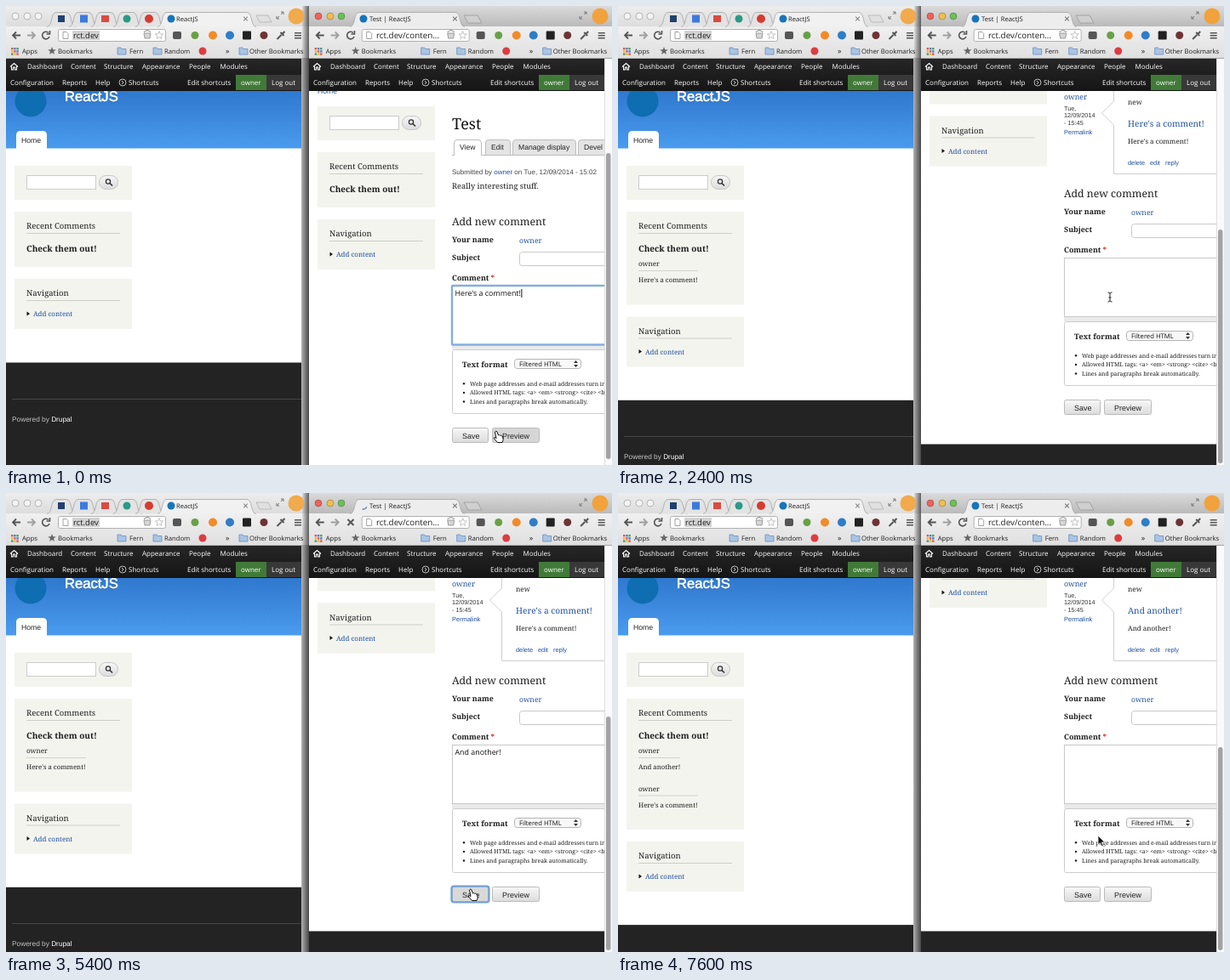
Write an HTML page that moves like this. It is 712 px wide and 540 px high and loops after 7.8 s.

```html
<!DOCTYPE html>
<html lang="en">
<head>
<meta charset="utf-8">
<title>Live comments</title>
<style>
html, body { margin: 0; width: 100%; height: 100%; overflow: hidden; background: #fff; }
svg { display: block; width: 712px; height: 540px; }
text { white-space: pre; text-rendering: geometricPrecision; }
.ui { font-family: "Open Sans", "Noto Sans", sans-serif; }
.sans { font-family: "Liberation Sans", Arial, sans-serif; }
.serif { font-family: "Noto Serif", Georgia, serif; }
</style>
</head>
<body>
<svg id="stage" viewBox="0 0 712 540" xmlns="http://www.w3.org/2000/svg"></svg>
<script>
const LOOP = 7800, STEP = 200;
const USER = 'owner', LINK = '#1f4f9e', INK = '#1e1e1e';
const FIRST = "Here's a comment!", SECOND = 'And another!';
const RIGHT = 356;

const esc = s => s.replace(/&/g, '&amp;').replace(/</g, '&lt;');
const text = (font, x, y, s, size, fill = INK, extra = '') =>
  `<text class="${font}" x="${x}" y="${y}" font-size="${size}" fill="${fill}" ${extra}>${esc(s)}</text>`;
const ui = (...a) => text('ui', ...a);
const sans = (...a) => text('sans', ...a);
const serif = (...a) => text('serif', ...a);
const bold = (x, y, s, size, fill = INK) => serif(x, y, s, size, fill, 'font-weight="700"');
const rect = (x, y, w, h, fill, extra = '') =>
  `<rect x="${x}" y="${y}" width="${w}" height="${h}" fill="${fill}" ${extra}/>`;
const circle = (x, y, r, fill, extra = '') => `<circle cx="${x}" cy="${y}" r="${r}" fill="${fill}" ${extra}/>`;
const path = (d, fill = 'none', stroke = 'none', w = 1, extra = '') =>
  `<path d="${d}" fill="${fill}" stroke="${stroke}" stroke-width="${w}" ${extra}/>`;
const group = (s, x = 0, y = 0, extra = '') => `<g transform="translate(${x} ${y})" ${extra}>${s}</g>`;
const hline = (x, y, w, color = '#cfcfca') => rect(x, y, w, 1, color);
const gradient = (id, a, b, flat) =>
  `<linearGradient id="${id}" x2="${flat ? 1 : 0}" y2="${flat ? 0 : 1}"><stop stop-color="${a}"/><stop offset="1" stop-color="${b}"/></linearGradient>`;
const clip = (id, x, w) => `<clipPath id="${id}">${rect(x, 100, w, 440, '#000')}</clipPath>`;

const defs = `<defs>
  ${gradient('sky', '#2f78ce', '#4a9bee')}${gradient('bar', '#262626', '#151515')}
  ${gradient('button', '#f7f7f7', '#dcdcdc')}${gradient('tool', '#f0f0f0', '#dfdfdf')}
  ${gradient('strip0', '#ededed', '#dcdcdc')}${gradient('strip1', '#dadada', '#b9b9b9')}
  ${gradient('edge', '#0001', '#0009', true)}
  ${clip('leftPage', 0, 347)}${clip('rightPage', 356, 347)}</defs>`;

// ---------- browser frame ----------
const star = (x, y, r, fill, stroke = 'none') => {
  const pts = Array.from({ length: 10 }, (_, i) => {
    const a = Math.PI * (i / 5 - 0.5), q = i % 2 ? r * 0.42 : r;
    return `${(x + q * Math.cos(a)).toFixed(1)} ${(y + q * Math.sin(a)).toFixed(1)}`;
  });
  return path(`M${pts.join('L')}Z`, fill, stroke, 0.8);
};
const folder = (x, y) => path(`M${x - 5} ${y - 4}h4l1 1.5h5v6.5h-10z`, '#a9c4e4', '#6c8fbb', 0.8);
const tabShape = (x, w, fill) =>
  path(`M${x} 24.5C${x + 7} 24 ${x + 4} 7.5 ${x + 11} 7.5H${x + w - 11}C${x + w - 4} 7.5 ${x + w - 7} 24 ${x + w} 24.5`, fill, '#a5a5a5', 0.8);
const cross = (x, y, r, color, w) => path(`M${x - r} ${y - r}l${2 * r} ${2 * r}m0 ${-2 * r}l${-2 * r} ${2 * r}`, 'none', color, w);

function tools() {
  const dark = '#555';
  let s = path('M17 34.5H8m4-4l-4 4l4 4', 'none', dark, 1.8)
    + path('M25 34.5h9m-4-4l4 4l-4 4', 'none', '#a0a0a0', 1.8)
    + rect(61.5, 27.5, 126, 14, '#fff', 'rx="2" stroke="#b0b0b0"')
    + path('M67 30.5h4l2 2v6h-6z', '#fff', '#8b8b8b', 0.8)
    + path('M162 32h8l-1 6h-6z', '#d6d6d6', '#888', 0.8) + path('M162 31c2-3 6-3 8 0', 'none', '#777')
    + star(180, 34.5, 5, '#fff', '#b5b5b5');
  s += rect(196, 30, 10, 9, '#555', 'rx="2"') + circle(222, 34.5, 4.5, '#69a046')
    + circle(243, 34.5, 5, '#f18b28') + circle(263, 34.5, 5, '#2f7dc6')
    + rect(278, 29.5, 10, 10, '#222', 'rx="1"') + circle(303, 34.5, 4.5, '#6d3335')
    + path('M318.5 39l5-5m-1-3l4 4m-2-2l3-3', 'none', dark, 2);
  for (const y of [31, 34, 37]) s += rect(339, y, 8, 1.5, dark);
  const hues = ['#e2574c', '#f3b23c', '#4f9d55', '#4682d8'];
  for (let i = 0; i < 9; i++) s += rect(6 + i % 3 * 3.2, 49 + (i / 3 | 0) * 3.2, 2.4, 2.4, hues[i * 3 % 4]);
  s += ui(19, 56, 'Apps', 7.7) + star(54, 53, 5, '#666') + ui(61, 56, 'Bookmarks', 7.7)
    + folder(136, 53) + ui(145, 56, 'Fern', 7.7) + folder(178, 53) + ui(186, 56, 'Random', 7.7)
    + circle(231, 53, 4.5, '#dd3c40') + ui(258, 56, '»', 9) + folder(279, 53)
    + ui(286, 56, 'Other Bookmarks', 7.7);
  return s;
}

const corner = x => path(`M${x + 1} 10l3-3m-3 0h3v3M${x - 1} 12l-3 3m3 0h-3v-3`, 'none', '#777', 1);
const reload = x => path(`M${x + 3} 31.5a4.3 4.3 0 1 0 1 4.5M${x + 4.5} 29v4h-4`, 'none', '#555', 1.6);

function leftFrame() {
  let s = rect(0, 0, 356, 25, 'url(#strip0)') + rect(0, 24, 356, 38, 'url(#tool)') + hline(0, 61, 356, '#b4b4b4');
  for (const x of [11, 25, 38]) s += circle(x, 12, 4, '#f4f4f4', 'stroke="#b5b5b5"');
  for (let i = 0; i < 5; i++) s += tabShape(48 + i * 26, 34, '#e3e3e3');
  s += rect(61, 11, 8, 8, '#20406f') + rect(87, 10.5, 9, 9, '#3c7ade') + rect(112, 11, 9, 8, '#d84c41')
    + circle(142, 15, 4.5, '#2b9985') + circle(168, 15, 5, '#d63b30')
    + tabShape(178, 116, '#f1f1f1') + circle(194, 15, 4.5, '#1676ba')
    + ui(200, 18, 'ReactJS', 7.6) + cross(281.5, 15, 2.3, '#888', 1.1)
    + path('M294 11h14l4 8h-14z', '#e0e0e0', '#b0b0b0', 0.8)
    + corner(322)
    + tools() + reload(47) + rect(78, 29, 32, 11, '#d2d2d2') + ui(79, 38, 'rct.dev', 9.5);
  return s;
}

function rightFrame() {
  let s = rect(356, 0, 356, 25, 'url(#strip1)') + rect(356, 24, 356, 38, 'url(#tool)') + hline(356, 61, 356, '#a4a4a4');
  [['#f0625a', 367], ['#f2bd4b', 381], ['#6cc057', 394]].forEach(([c, x]) => s += circle(x, 12, 4, c, 'stroke="#0005" stroke-width=".7"'));
  s += tabShape(404, 135, '#ededed') + ui(427, 18, 'Test | ReactJS', 7.7) + cross(527.5, 15, 2.3, '#777', 1.1)
    + path('M538 11h16l5 9h-16z', '#cfcfcf', '#999', 0.8)
    + corner(678) + circle(698, 12, 9.5, '#f1a23c')
    + group(tools(), 356.7) + ui(435, 38, 'rct.dev/conten...', 9.85)
    + `<g id="idle">${circle(420, 15, 4.5, '#1676ba')}${reload(405)}</g>`
    + `<g id="busy">${cross(405, 34.5, 3.5, '#555', 2)}${path('M420 11a4 4 0 0 1 4 4', 'none', '#7186a5', 1.5, 'id="spin"')}</g>`;
  return s;
}

function menu(x) {
  let s = rect(0, 62, 347, 38, 'url(#bar)') + rect(270, 81, 36, 18, '#417a38') + rect(306, 81, 41, 18, '#383838')
    + path('M5 71.5l4.5-4l4.5 4M6.5 71v4h2v-3h2v3h2v-4', 'none', '#fff', 1.1)
    + circle(137, 90, 4, 'none', 'stroke="#bbb"') + path('M136 88l2 2l-2 2', 'none', '#ccc');
  const rows = [
    [74.3, [25, 'Dashboard'], [76, 'Content'], [115, 'Structure'], [160, 'Appearance'], [215, 'People'], [251.5, 'Modules']],
    [93, [5, 'Configuration'], [66, 'Reports'], [105, 'Help'], [144, 'Shortcuts'], [213, 'Edit shortcuts'], [276, USER], [312, 'Log out']]
  ];
  for (const [y, ...items] of rows) for (const [tx, label] of items) s += ui(tx, y, label, 8, '#fff');
  return group(s, x);
}

// ---------- pages ----------
function sidebar(comments) {
  const grow = comments.length * 44.5, paper = '#f3f4ee';
  let s = rect(10, 188, 138, 40, paper) + rect(24.5, 199.5, 81, 16, '#fff', 'stroke="#ccc"')
    + rect(109.5, 199.5, 22, 16, 'url(#button)', 'rx="8" stroke="#c6c6c6"')
    + circle(120, 206.5, 2.6, 'none', 'stroke="#333" stroke-width="1.3"') + path('M122 208.5l3 3', 'none', '#333', 1.6)
    + rect(10, 242, 138, 65 + grow, paper) + serif(24, 262, 'Recent Comments', 9.5) + hline(24, 267, 110)
    + bold(24, 289, 'Check them out!', 10);
  comments.forEach((c, i) => {
    const y = 306 + i * 44.5;
    s += serif(24, y, USER, 8) + hline(24, y + 5, c === FIRST ? 70 : 49, '#d3d3ce') + serif(24, y + 19, c, 7.8);
  });
  const nav = rect(10, 321, 138, 59, paper) + serif(24, 341, 'Navigation', 9.5) + hline(24, 346, 110)
    + path('M24.5 359.5l3.5 2.5l-3.5 2.5z', '#111') + serif(32, 365, 'Add content', 8, LINK);
  return s + group(nav, 0, grow);
}

function leftPage(comments) {
  const y = 419.5 + comments.length * 44.3;
  return sidebar(comments) + rect(0, y, 347, 540, '#232323') + hline(7, Math.round(y + 42.5), 340, '#454545')
    + `<text class="sans" x="7" y="${y + 69.5}" font-size="8.3" fill="#c4c4c4">Powered by <tspan fill="#fff">Drupal</tspan></text>`;
}

const header = rect(0, 100, 347, 67.5, 'url(#sky)') + circle(29, 112, 18.5, '#0f6db2')
  + sans(69, 113, 'ReactJS', 16.6, '#1c4f8d') + sans(69, 112, 'ReactJS', 16.6, '#fff', 'stroke="#fff" stroke-width=".6"')
  + path('M12 168V152q0-5 5-5h26q5 0 5 5v16z', '#fff') + sans(18, 160.5, 'Home', 8.7, '#222');

function article() {
  const tab = (x, w, s, fill = '#e4e4e4') =>
    path(`M${x + 0.5} 175V161q0-3.5 3.5-3.5h${w - 7}q3.5 0 3.5 3.5v14`, fill, '#bdbdbd') + sans(x + 7, 169, s, 8.6, '#222');
  return sans(366, 103, 'Home', 8.6, LINK) + serif(524, 145, 'Test', 18, '#111')
    + hline(524, 175, 180, '#bdbdbd') + tab(563, 29, 'Edit') + tab(595, 74, 'Manage display') + tab(672, 40, 'Devel')
    + tab(526, 32, 'View', '#fff') + rect(527, 174, 31, 2, '#fff')
    + `<text class="sans" x="524" y="198" font-size="8.05" fill="#444">Submitted by <tspan fill="${LINK}">${USER}</tspan> on Tue, 12/09/2014 - 15:02</text>`
    + serif(524, 215, 'Really interesting stuff.', 9.25);
}

function reply(comment) {
  let s = serif(524, 110, USER, 8.8, LINK) + sans(524, 151, 'Permalink', 7.5, LINK);
  ['Tue,', '12/09/2014', '- 15:45'].forEach((line, i) => s += sans(524, 123 + i * 8.3, line, 7.3, '#333'));
  s += path('M582.5 95v17l-14 14l14 14v57.5H712', '#fff', '#cfcfcf')
    + serif(599, 116, 'new', 8.2) + serif(599, 142, comment, 10.1, LINK) + serif(599, 162, comment, 8);
  [[599, 'delete'], [625, 'edit'], [643, 'reply']].forEach(([x, w]) => s += sans(x, 186.5, w, 7.4, LINK));
  return s + rect(356, 515.5, 347, 25, '#232323');
}

function form() {
  const button = (id, x, w, s, tx) =>
    rect(x + 0.5, 496.5, w - 1, 17, 'url(#button)', `id="${id}" rx="2" stroke="#bbb"`) + sans(tx, 508.5, s, 9, '#222');
  let s = serif(524, 258, 'Add new comment', 12.3) + bold(524, 278, 'Your name', 8.9)
    + serif(603, 278.5, USER, 8.6, LINK) + bold(524, 299, 'Subject', 8.8)
    + rect(603.5, 289.5, 120, 16, '#fff', 'rx="3" stroke="#c9c9c9"') + bold(524, 323, 'Comment', 8.9) + bold(569.5, 323, '*', 8.9, '#d22')
    + rect(524, 398, 190, 6, '#eaeaea') + rect(524.5, 404.5, 200, 75, '#fff', 'rx="2" stroke="#ccc"')
    + rect(524.5, 329.5, 200, 69, '#fff', 'stroke="#c8c8c8"')
    + rect(524, 329, 200, 69.5, 'none', 'id="glow" rx="1" stroke="#84aede" stroke-width="2.4"')
    + '<text id="draft" class="ui" x="527.5" y="341" font-size="8.9" fill="#111"></text>' + rect(0, 333, 1, 10, '#111', 'id="caret"')
    + bold(536, 425, 'Text format', 8.9)
    + rect(597.5, 415.5, 78, 11, '#f8f8f8', 'rx="3" stroke="#b4b4b4"') + ui(603, 424, 'Filtered HTML', 7.7, '#111')
    + path('M667 420l2.5-3l2.5 3zM667 422l2.5 3l2.5-3z', '#333');
  ['Web page addresses and e-mail addresses turn into links', 'Allowed HTML tags: <a> <em> <strong> <cite> <blockquote>',
    'Lines and paragraphs break automatically.'].forEach((line, i) => {
    const y = 446.5 + i * 10.6;
    s += circle(538, y - 2.2, 1.2, INK) + serif(545, y, line, 6.8);
  });
  return s + button('save', 524, 43, 'Save', 536) + button('preview', 571, 56, 'Preview', 583)
    + rect(523.5, 495.5, 44, 19, 'none', 'id="ring" rx="3" stroke="#6f9fd8" stroke-width="2.2"');
}

const pointers = {
  arrow: path('M0 0v11l2.6-2.3l1.8 4l1.8-.8l-1.8-3.9h3.5z', '#111', '#fff', 0.8),
  hand: path('M-1.5 1q1.5-2 2.5 0l1.5 4q1-1 2 .3q1-.6 1.7.5q1.3-.2 1.5 1.2l.5 3.5l-1.2 3h-5.5l-4-4.5q-.7-1.5 1-1.4l1.5 1z', '#fff', '#111', 1),
  beam: path('M-2.5-5q2.5 0 2.5 1.5v8q0 1.5-2.5 1.5M2.5-5q-2.5 0-2.5 1.5m0 8q0 1.5 2.5 1.5M-1.5 1h3', 'none', '#111', 0.9)
};

const threads = [[], [FIRST], [SECOND, FIRST]];
const sideShift = [-70, -236, -334];
const views = fn => threads.map(fn).join('');
document.getElementById('stage').innerHTML = defs + rect(0, 0, 712, 540, '#fff')
  + `<g clip-path="url(#leftPage)">${header}${views((c, i) => group(leftPage(c), 0, 0, `id="left${i}"`))}</g>`
  + `<g clip-path="url(#rightPage)">${views((c, i) =>
      `<g id="right${i}">${group(sidebar(c), RIGHT, sideShift[i])}${i ? reply(c[0]) : article()}</g>`)}<g id="form">${form()}</g></g>`
  + menu(0) + menu(RIGHT) + rect(347, 62, 9, 478, '#b0b0b0') + leftFrame()
  + rect(348, 0, 8, 540, 'url(#edge)') + circle(341, 12, 9.5, '#f1aa4c') + rightFrame()
  + rect(703, 62, 9, 478, '#fafafa') + rect(703, 62, 1, 478, '#dedede')
  + rect(705, 0, 5.5, 0, '#a3a3a3', 'id="thumb" rx="2.7"')
  + Object.entries(pointers).map(([k, s]) => `<g id="${k}">${s}</g>`).join('');

// ---------- motion ----------
const $ = id => document.getElementById(id);
const show = (id, on) => { $(id).style.display = on ? '' : 'none'; };
const within = (t, a, b) => t >= a && t < b;

const track = [
  [0, 576, 500, 'hand'], [400, 576, 500, 'hand'], [800, 546, 499, 'hand'], [1200, 546, 499, 'hand'],
  [1400, 560, 430, 'arrow'], [1800, 578, 329, 'arrow'], [2200, 578, 331, 'arrow'], [2400, 578, 342, 'beam'],
  [3000, 578, 342, ''], [4600, 578, 342, 'beam'], [4800, 566, 392, 'arrow'], [5000, 546, 466, 'hand'],
  [5600, 546, 466, 'hand'], [5800, 548, 458, 'arrow'], [6000, 548, 447, 'arrow'], [6600, 550, 440, 'arrow'],
  [7200, 564, 406, 'arrow'], [7600, 564, 403, 'arrow']
];

function pointerAt(t) {
  const i = track.findLastIndex(k => k[0] <= t), a = track[i], b = track[i + 1] || a;
  const p = a === b ? 0 : (t - a[0]) / (b[0] - a[0]);
  return { x: a[1] + (b[1] - a[1]) * p, y: a[2] + (b[2] - a[2]) * p, kind: a[3] };
}

function draftAt(t) {
  if (t < 2400) return FIRST;
  if (t >= 6200) return '';
  const typed = t <= 3600 ? (t - 2800) / 200 : 4 + (t - 3600) / 100;
  return SECOND.slice(0, Math.max(0, Math.floor(typed)));
}

function draw(t) {
  const left = t < 2200 ? 0 : t < 6000 ? 1 : 2;
  const right = t < 2400 ? 0 : t < 6200 ? 1 : 2;
  for (let i = 0; i < 3; i++) { show('left' + i, i === left); show('right' + i, i === right); }
  $('form').setAttribute('transform', `translate(0 ${right ? -33 : 0})`);

  const busy = within(t, 1000, 2200) || within(t, 5200, 6000);
  show('busy', busy);
  show('idle', !busy);
  $('spin').setAttribute('transform', `rotate(${(t - 1800) * 0.45 - 70} 420 15)`);

  const saving = within(t, 1000, 2400) || within(t, 5200, 6200);
  const focus = t < 1000 || within(t, 2800, 5200);
  show('ring', saving);
  show('glow', focus);
  $('save').setAttribute('fill', saving || within(t, 800, 1000) || t === 5000 ? '#d9d9d9' : 'url(#button)');
  $('preview').setAttribute('fill', t < 600 ? '#d6d6d6' : 'url(#button)');

  const draft = draftAt(t);
  $('draft').textContent = draft;
  show('caret', focus && (within(t, 2800, 4600) || t % 1000 < 600));
  $('caret').setAttribute('x', 528 + (draft ? $('draft').getComputedTextLength() : 0));

  const top = [173, 263, 299][right];
  $('thumb').setAttribute('y', top);
  $('thumb').setAttribute('height', (right ? 538 : 533) - top);

  const p = pointerAt(t);
  for (const k in pointers) show(k, k === p.kind);
  if (p.kind) $(p.kind).setAttribute('transform', `translate(${p.x} ${p.y})`);
}

const start = performance.now();
function tick() {
  const t = (performance.now() - start) % LOOP;
  draw(Math.floor(t / STEP) * STEP);
  requestAnimationFrame(tick);
}
tick();
</script>
</body>
</html>
```
